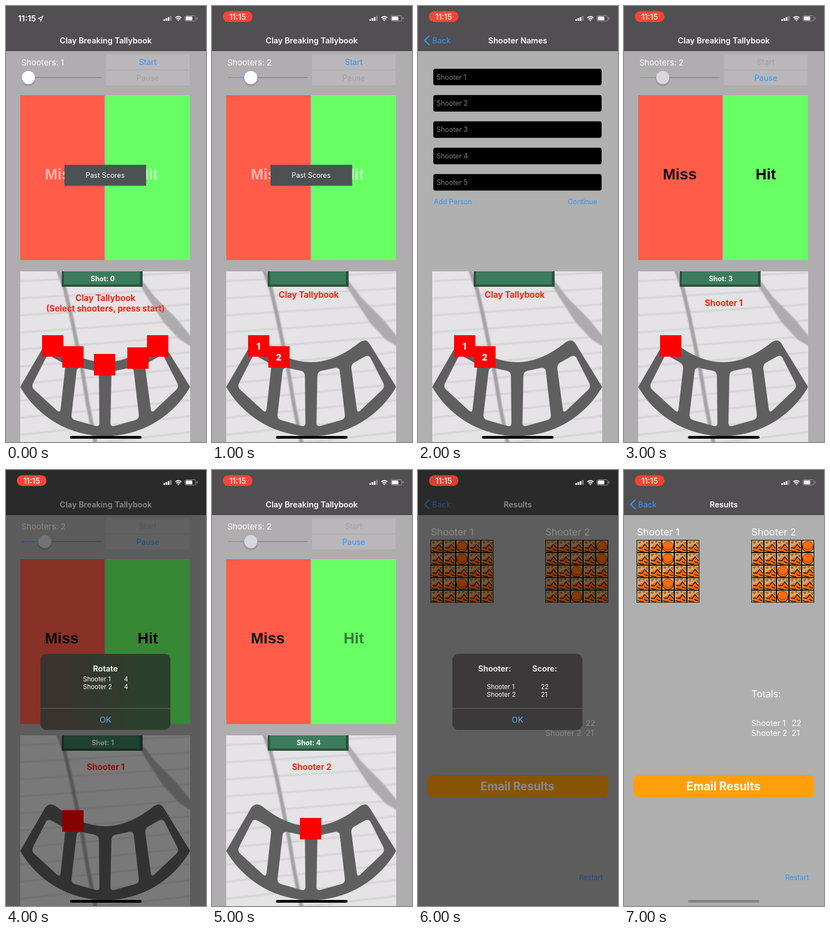
Animation, 366 px wide and 792 px high, one loop 8 s. Source, as an HTML page:

```html
<!DOCTYPE html>
<html lang="en">
<head>
<meta charset="utf-8">
<title>Clay score app</title>
<style>
html, body { margin: 0; width: 100%; height: 100%; overflow: hidden; background: #afafaf; }
svg { display: block; width: 366px; height: 792px; font-family: Inter, sans-serif; }
</style>
</head>
<body>
<svg id="stage" viewBox="0 0 366 792"></svg>
<script>
const BLUE = '#3396f5';
const APP = 'Clay Breaking Tallybook';
const CARD = 'Clay Tallybook';

const rect = (x, y, w, h, fill, r = 0, extra = '') =>
  `<rect x="${x}" y="${y}" width="${w}" height="${h}" rx="${r}" fill="${fill}" ${extra}/>`;
const path = (d, fill, stroke = 'none', width = 1, extra = '') =>
  `<path d="${d}" fill="${fill}" stroke="${stroke}" stroke-width="${width}" ${extra}/>`;
const text = (s, x, y, size, fill = '#fff', weight = 400, anchor = 'start', extra = '') =>
  `<text x="${x}" y="${y}" font-size="${size}" fill="${fill}" font-weight="${weight}" text-anchor="${anchor}" ${extra}>${s}</text>`;
const centered = (s, x, y, size, fill, weight, extra) => text(s, x, y, size, fill, weight, 'middle', extra);

// Closed polygon with rounded corners
function rounded(points, r) {
  const toward = (a, b) => {
    const k = r / Math.hypot(b[0] - a[0], b[1] - a[1]);
    return [a[0] + (b[0] - a[0]) * k, a[1] + (b[1] - a[1]) * k];
  };
  return points.map((p, i) => {
    const prev = points.at(i - 1), next = points[(i + 1) % points.length];
    return `${i ? 'L' : 'M'}${toward(p, prev)}Q${p} ${toward(p, next)}`;
  }).join('') + 'Z';
}

const dim = () => rect(0, 0, 366, 792, '#000', 0, 'opacity=".47"');
const homeBar = (fill = '#000') => rect(117, 781, 131, 5, fill, 2.5);

function header(title, back) {
  return rect(0, 0, 366, 82, '#514f51') + centered(title, 182.5, 68, 14.5, '#fff', 600) +
    (back ? path('M21 54L12 62.5L21 71', 'none', BLUE, 2.4) + text('Back', 26, 68, 14.4, BLUE) : '');
}

function status(pill) {
  const clock = pill
    ? rect(20, 9.5, 54, 19.5, pill, 9.7) + centered('11:15', 47, 24.5, 14.2, '#fff', 500)
    : text('11:15', 22, 28, 15, '#fff', 600) + path('M59 23L67.5 18.5L63.5 27.5L63 23.5Z', 'none', '#fff', 1.2);
  const bars = [3, 5, 7, 9].map((h, i) =>
    rect(288 + i * 4, 27 - h, 3, h, i == 3 ? '#888688' : '#fff', .7)).join('');
  const wifi = path('M310 21.5Q315.5 17 321 21.5M312 24Q315.5 21 319 24', 'none', '#fff', 1.7) +
    path('M313.4 25.5Q315.5 24 317.6 25.5L315.5 27.8Z', '#fff');
  const battery = rect(327.5, 17.5, 20, 10, 'none', 3, 'stroke="#a09ea0"') +
    rect(329, 19, 12, 7, '#fff', 1.5) + rect(349, 20.5, 1.4, 4, '#a09ea0', .7);
  return clock + bars + wifi + battery;
}

const SPOTS = [[66, 598], [103, 618], [161, 632], [222, 620], [258, 598]];
const HOLES = [
  [[76, 633], [109, 651], [99, 740], [46, 692]],
  [[130, 656], [170, 664], [171, 765], [119, 750]],
  [[193, 664], [233, 656], [244, 750], [191, 765]],
  [[254, 651], [287, 633], [317, 692], [266, 740]]
];
const FAN = 'M26 692L72 613Q80 603 92 611Q181 683 270 611Q282 603 288 613L337 692A180 180 0 0 1 26 692Z' +
  HOLES.map(h => rounded(h, 8)).join('');

// Range picture with station squares; lines are [text, x, baseline]
function range({ shot, lines, squares, numbered }) {
  let planks = '';
  for (let i = 0; i < 11; i++) planks += `M26 ${500 + i * 31}L337 ${484 + i * 29}`;
  return '<svg x="26" y="482" width="311" height="310" viewBox="26 482 311 310">' +
    '<filter id="soft"><feGaussianBlur stdDeviation="1.2"/></filter>' +
    rect(26, 482, 311, 310, '#e5e3e6') + '<g filter="url(#soft)">' +
    path(planks, 'none', '#cfcdd0', 2.5) +
    path('M95 478L108 515L119 562L130 615L141 670L150 725L164 795', 'none', '#a3a1a4', 7) +
    path('M227 478L234 478L272 528L312 568L345 608L345 622L318 606L288 574L258 528Z', '#adabae') + '</g>' +
    path(FAN, '#5f5f5f', 'none', 0, 'fill-rule="evenodd"') + '</svg>' +
    rect(102, 482, 148, 28, '#2c4f3f') + rect(106, 482, 139, 24, '#3a7c5b') +
    (shot ? centered(`Shot: ${shot}`, 177, 499.5, 12.5, '#fff', 700) : '') +
    lines.map(([s, x, y]) => centered(s, x, y, 15.3, '#ff2410', 700)).join('') +
    squares.map(i => {
      const [x, y] = SPOTS[i];
      return rect(x, y, 39, 39, '#f00') +
        (numbered ? centered(i + 1, x + 19, y + 26, 16, '#fff', 800) : '');
    }).join('') + homeBar();
}

function main({ shooters, playing, past, hitAlpha = 1, ...card }) {
  const thumb = shooters == 1 ? 41 : 71;
  const word = (s, x, alpha) => centered(s, x, 314.7, 28, past ? '#fff' : '#000', 700,
    `font-family="Liberation Sans, sans-serif" opacity="${past ? .55 : alpha}"`);
  const button = (s, y, on) =>
    rect(183, y, 153, 27, '#b9b7b9') + centered(s, 259.5, y + 18.5, 14.4, on ? BLUE : '#a4a2a4');
  return rect(0, 0, 366, 792, '#afadaf') + header(APP) +
    text(`Shooters: ${shooters}`, 28, 108, 15) +
    rect(29, 129, 146, 2, '#8e8c8e', 1) + rect(29, 129, thumb - 29, 2, shooters == 1 ? '#8e8c8e' : '#62a4e2', 1) +
    `<circle cx="${thumb}" cy="132.5" r="13" fill="#000" opacity=".12"/>` +
    `<circle cx="${thumb}" cy="130" r="12" fill="${playing ? '#d9d7d9' : '#fff'}"/>` +
    button('Start', 88, !playing) + button('Pause', 117, playing) +
    rect(26, 162, 154, 299.5, '#ff5c4a') + rect(182, 162, 154.5, 299.5, '#68ff64') +
    word('Miss', 102, .92) + word('Hit', 259.5, hitAlpha) +
    (past ? rect(107, 288.5, 149.5, 38, '#4c5152') + centered('Past Scores', 181.5, 312, 12.7) : '') +
    range(card);
}

function names() {
  let fields = '';
  for (let i = 0; i < 5; i++) {
    const y = 114 + i * 47.8;
    fields += rect(28, y, 308, 30, '#000', 4) + text(`Shooter ${i + 1}`, 34, y + 19.5, 12.4, '#828282');
  }
  return rect(0, 0, 366, 792, '#b0b0b0') + header('Shooter Names', true) + fields +
    text('Add Person', 29, 360, 12.7, BLUE) + text('Continue', 274, 360, 12.7, BLUE) +
    range({ lines: [[CARD, 177, 529.5]], squares: [0, 1], numbered: true });
}

const BROKEN = rect(0, 0, 21, 21, '#cda870') +
  path('M6 10L14 6L20 12L20 21L5 21L2 15Z', '#ff6a0c') +
  path('M2 13L9 14L14 7L20 14M13 15Q15 18 20 18M1 18Q7 21 12 20', 'none', '#241307', 1.6) +
  path('M2 3L7 2L5 6ZM10 2L14 1L12 4ZM16 4L20 3L19 8Z', '#f0640f', '#5a3516', .6);
const WHOLE = rect(0, 0, 21, 21, '#cda870') +
  '<ellipse cx="10.5" cy="12" rx="10" ry="8.6" fill="#ff6a0c" stroke="#241307" stroke-width="1.2"/>' +
  '<ellipse cx="10.5" cy="9" rx="9.3" ry="7.6" fill="#ff6a0c" stroke="#8a3a06" stroke-width="1"/>';

function grid(x, misses) {
  let out = rect(x, 127, 115, 114, '#000');
  for (let i = 0; i < 25; i++) {
    const cx = x + 1 + i % 5 * 23, cy = 128 + Math.floor(i / 5) * 22.8;
    out += `<g transform="translate(${cx} ${cy})">${misses.includes(i) ? WHOLE : BROKEN}</g>`;
  }
  return out;
}

const results = () => rect(0, 0, 366, 792, '#afafaf') + header('Results', true) +
  text('Shooter 1', 23.5, 119, 17.8) + text('Shooter 2', 233, 119, 17.8) +
  grid(23, [2, 7, 17]) + grid(233, [4, 9, 12, 22]) +
  text('Totals:', 233, 412.5, 17.4) +
  text('Shooter 1', 233, 465, 14.3) + text('22', 307, 465, 14.3) +
  text('Shooter 2', 233, 483, 14.3) + text('21', 307, 483, 14.3) +
  rect(17, 554, 331, 40.5, '#ff9f0c', 10) + centered('Email Results', 182, 581.5, 20.8, '#fff', 700) +
  text('Restart', 295, 745, 12.9, BLUE);

const dialog = (fill, content) => rect(63, 334, 238, 138, fill, 11) + content +
  rect(63, 432.5, 238, 1, '#686868') + centered('OK', 182, 458.5, 15, '#5aaef8');

const rows = (list, x, scoreX, y) => list.map((score, i) =>
  text(`Shooter ${i + 1}`, x, y + i * 14, 11.5) + text(score, scoreX, y + i * 14, 11.5)).join('');

const TINT = '<linearGradient id="tint"><stop offset=".2" stop-color="#38332e"/><stop offset=".8" stop-color="#2b402c"/></linearGradient>';
const RED = '#ff4436';
const turn = (shot, shooter, spot) =>
  ({ shooters: 2, playing: true, shot, lines: [[`Shooter ${shooter}`, 182.5, 545]], squares: [spot] });

const SCENES = [
  main({ shooters: 1, past: true, shot: '0', squares: [0, 1, 2, 3, 4],
    lines: [[CARD, 182, 536], ['(Select shooters, press start)', 182, 554.5]] }) + status(),
  main({ shooters: 2, past: true, squares: [0, 1], numbered: true, lines: [[CARD, 177, 529.5]] }) + status(RED),
  names() + status(RED),
  main(turn(3, 1, 0)) + status(RED),
  TINT + main(turn(1, 1, 1)) + dim() + dialog('url(#tint)',
    centered('Rotate', 182, 366, 14.6, '#fff', 600) + rows([4, 4], 141, 216, 384)) + status(RED),
  main({ ...turn(4, 2, 2), hitAlpha: .5 }) + status(RED),
  results() + dim() + dialog('#3b393a',
    text('Shooter:', 110, 366, 14.6, '#fff', 600) + text('Score:', 209, 366, 14.6, '#fff', 600) +
    rows([22, 21], 126, 225, 398)) + status('#e03d30'),
  results() + homeBar('#858585') + status('#f8422f')
];

const stage = document.getElementById('stage');
let shown = -1;
function draw(now) {
  const scene = Math.floor(now / 1000) % SCENES.length;
  if (scene !== shown) stage.innerHTML = SCENES[shown = scene];
  requestAnimationFrame(draw);
}
draw(performance.now());
</script>
</body>
</html>
```
